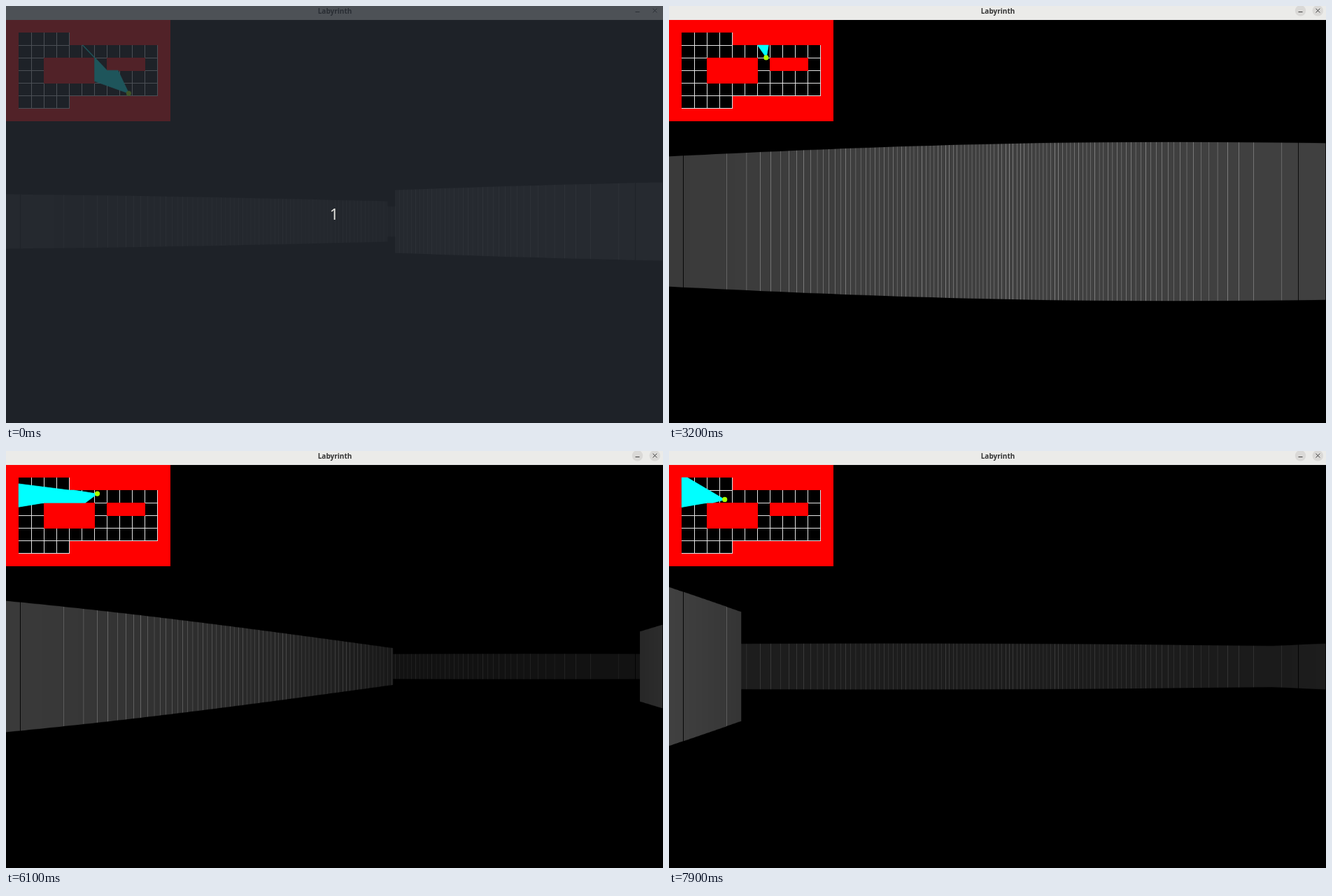
Recreate the animation shown at these times as an HTML page with a canvas. Size 939 by 597 pixels, loop 8 s.

```html
<!DOCTYPE html>
<html lang="en">
<head>
<meta charset="utf-8">
<title>Labyrinth</title>
<style>
html, body { margin: 0; width: 100%; height: 100%; overflow: hidden; background: #000; }
canvas { display: block; }
</style>
</head>
<body>
<canvas id="stage" width="939" height="597"></canvas>
<script>
const LOOP = 8000, TICK = 100;
const W = 939, H = 597, TOP = 20;
const VIEW_W = 1300, VIEW_H = 799, SCALE = W / VIEW_W;
const CELL = 25 * SCALE, WALL = 4090;
const FOV = Math.PI / 4, RAYS = 1400;
const LENS = 1568.86, CENTER = VIEW_W / 2 + 0.16;

// '.' is floor, '#' the surrounding wall, 'X' a block standing inside.
const MAZE = [
  '#############',
  '#....########',
  '#...........#',
  '#..XXXX.XXX.#',
  '#..XXXX.....#',
  '#...........#',
  '#....########',
  '#############'
];

const ctx = document.getElementById('stage').getContext('2d');
const view = document.createElement('canvas');
view.width = VIEW_W;
view.height = VIEW_H;
const viewCtx = view.getContext('2d');

// Replays the key presses up to the given time; heading 0 looks left, 90 looks up.
function poseAt(time) {
  let x = 175.7, y = 125.25, heading = 42.2;
  const part = (start, ticks) =>
    Math.min(1, Math.max(0, (time - start) / TICK + 1) / ticks);
  const move = (angle, distance) => {
    x -= Math.cos(angle * Math.PI / 180) * distance;
    y -= Math.sin(angle * Math.PI / 180) * distance;
  };
  const walk = (start, ticks, distance) => move(heading, distance * part(start, ticks));
  const strafe = (start, ticks, distance) => move(heading + 90, distance * part(start, ticks));
  const turn = (start, ticks, degrees) => { heading += degrees * part(start, ticks); };

  walk(400, 2, 8.2);
  walk(700, 9, 37.1);
  strafe(1700, 1, 1.9);
  turn(2400, 1, 35.3);
  walk(2800, 5, 19.8);
  walk(3600, 2, 8.95);
  turn(3900, 3, -46.5);
  turn(4300, 2, -46);
  strafe(4700, 2, 5.45);
  turn(5100, 2, 34.6);
  turn(5600, 2, -33.35);
  walk(6100, 7, 35.95);
  turn(6800, 1, -12.55);
  turn(6900, 1, 13.3);
  walk(6900, 2, 11);
  turn(7200, 2, 16.4);
  turn(7700, 1, 4.6);
  walk(7800, 2, 10.3);
  return { x, y, heading };
}

// Walks the grid until a wall; returns the distance in stage pixels.
function cast(x, y, dx, dy) {
  const gx = x / CELL, gy = (y - TOP) / CELL;
  let col = Math.floor(gx), row = Math.floor(gy), dist = 0;
  const deltaX = Math.abs(1 / dx), deltaY = Math.abs(1 / dy);
  let nextX = (dx > 0 ? col + 1 - gx : gx - col) * deltaX;
  let nextY = (dy > 0 ? row + 1 - gy : gy - row) * deltaY;
  while (MAZE[row][col] === '.') {
    if (nextX < nextY) {
      dist = nextX;
      nextX += deltaX;
      col += Math.sign(dx);
    } else {
      dist = nextY;
      nextY += deltaY;
      row += Math.sign(dy);
    }
  }
  return Math.max(0.1, dist * CELL);
}

function drawView({ x, y, heading }) {
  const hits = [];
  viewCtx.globalCompositeOperation = 'source-over';
  viewCtx.fillStyle = '#000';
  viewCtx.fillRect(0, 0, VIEW_W, VIEW_H);
  // Columns sharing a pixel add up to a bright line.
  viewCtx.globalCompositeOperation = 'lighter';
  for (let i = 0; i < RAYS; i++) {
    const turn = (i / RAYS - 0.5) * FOV;
    const angle = heading * Math.PI / 180 + turn;
    const dx = -Math.cos(angle), dy = -Math.sin(angle);
    const dist = cast(x, y, dx, dy);
    hits.push([x + dx * dist, y + dy * dist]);
    const column = Math.floor(CENTER + LENS * Math.tan(turn));
    const height = WALL / dist / SCALE;
    const grey = Math.round(128 / (1 + 0.055 * dist));
    viewCtx.fillStyle = `rgb(${grey},${grey},${grey})`;
    viewCtx.fillRect(column, (VIEW_H - height) / 2, 1, height);
  }
  ctx.drawImage(view, 0, TOP, W, H - TOP);
  return hits;
}

function eachCell(mark, draw) {
  MAZE.forEach((line, row) => [...line].forEach((cell, col) => {
    if (cell !== mark) return;
    const left = Math.floor(col * CELL), top = Math.floor(TOP + row * CELL);
    const right = Math.floor((col + 1) * CELL), bottom = Math.floor(TOP + (row + 1) * CELL);
    draw(left, top, right - left, bottom - top);
  }));
}

function drawMap({ x, y }, hits) {
  ctx.fillStyle = '#f00';
  ctx.fillRect(0, TOP, Math.ceil(13 * CELL), Math.ceil(8 * CELL));
  ctx.fillStyle = '#000';
  eachCell('.', (left, top, w, h) => ctx.fillRect(left, top, w, h));
  ctx.fillStyle = '#e4e4e4';
  eachCell('.', (left, top, w, h) => {
    ctx.fillRect(left + w, top, 1, h + 1);
    ctx.fillRect(left, top + h, w + 1, 1);
  });
  ctx.fillStyle = '#f00';
  eachCell('X', (left, top, w, h) => ctx.fillRect(left, top, w + 1, h + 1));

  ctx.beginPath();
  ctx.moveTo(x, y);
  hits.forEach(hit => ctx.lineTo(...hit));
  ctx.closePath();
  ctx.fillStyle = ctx.strokeStyle = '#0ff';
  ctx.lineWidth = 0.7;
  ctx.lineJoin = 'round';
  ctx.fill();
  ctx.stroke();
  ctx.fillStyle = '#af0';
  disc(x - 0.3, y - 0.2, 3.6);
}

function disc(x, y, radius) {
  ctx.beginPath();
  ctx.arc(x, y, radius, 0, 2 * Math.PI);
  ctx.fill();
}

function label(text, font, x, y, color) {
  ctx.font = font;
  ctx.textAlign = 'center';
  ctx.fillStyle = color;
  ctx.fillText(text, x, y);
}

function drawTitle(focused) {
  ctx.fillStyle = '#ebebe9';
  ctx.fillRect(0, 0, W, TOP);
  if (focused) {
    ctx.fillStyle = '#dad9d7';
    disc(902.5, 6.8, 7.7);
    disc(927.3, 6.8, 7.7);
  }
  label('Labyrinth', 'bold 10px "Noto Sans", sans-serif', 470, 10.5, '#333');
  ctx.strokeStyle = '#3d3d3d';
  ctx.lineWidth = 1;
  ctx.beginPath();
  ctx.moveTo(899.5, 8.5);
  ctx.lineTo(905.5, 8.5);
  ctx.moveTo(924.5, 3.7);
  ctx.lineTo(930.3, 9.5);
  ctx.moveTo(930.3, 3.7);
  ctx.lineTo(924.5, 9.5);
  ctx.stroke();
}

function drawCountdown() {
  ctx.fillStyle = 'rgba(38,43,51,0.8)';
  ctx.fillRect(0, 0, W, H);
  label('1', '22px "Noto Sans", sans-serif', 469, 306, '#e2e2de');
}

const begin = performance.now();
let shown = -1;

function frame() {
  const tick = Math.floor((performance.now() - begin) % LOOP / TICK);
  if (tick !== shown) {
    shown = tick;
    const pose = poseAt(tick * TICK);
    drawMap(pose, drawView(pose));
    drawTitle(tick > 0);
    if (tick === 0) drawCountdown();
  }
  requestAnimationFrame(frame);
}
frame();
</script>
</body>
</html>
```
